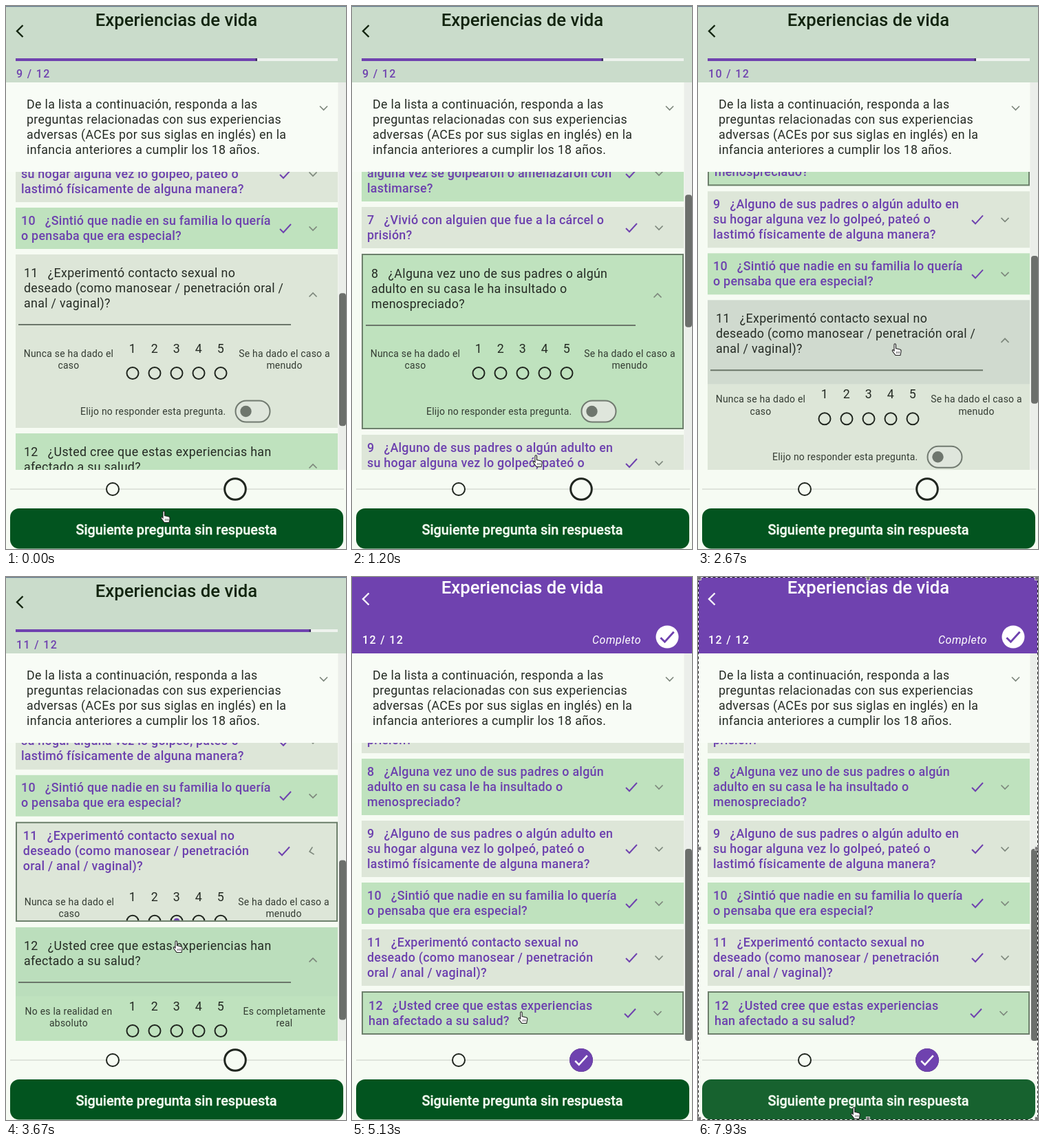
Write an HTML page that moves like this. It is 494 px wide and 789 px high and loops after 8 s.

```html
<!DOCTYPE html>
<html lang="es">
<head>
<meta charset="utf-8">
<title>Experiencias de vida</title>
<style>
  html, body { margin: 0; width: 100%; height: 100%; overflow: hidden; background: #f6fbf3; }
  svg { display: block; width: 100vw; height: 100vh; font-family: Roboto, sans-serif; }
  text { white-space: pre; }
  .body { font-size: 17.8px; letter-spacing: .33px; fill: #252b24; }
  .done { font-size: 17.85px; font-weight: 500; letter-spacing: .25px; fill: #6c40ae; }
  .label { font-size: 13.9px; letter-spacing: .26px; fill: #333b32; }
  .head { font-size: 25.7px; font-weight: 500; }
  .count { font-size: 16px; font-weight: 500; letter-spacing: 1.35px; }
  .state { font-size: 16px; font-style: italic; letter-spacing: .5px; fill: #fff; }
  .button { font-size: 19.85px; font-weight: 500; fill: #f3faf0; stroke: #f3faf0; stroke-width: .35px; }
  .mid { text-anchor: middle; }
</style>
</head>
<body>
<svg id="stage" viewBox="0 0 494 789" preserveAspectRatio="none"></svg>
<script>
const LOOP = 8000, PURPLE = '#6f42af', INK = '#20261f', PAPER = '#f6fbf3';
const VIEW = { top: 111, bottom: 674, list: 241, height: 563 };
const FIRST_TOP = 726, GAP = 8;
const stage = document.getElementById('stage');

const often = [['Nunca se ha dado el', 'caso'], ['Se ha dado el caso a', 'menudo']];
const real = [['No es la realidad en', 'absoluto'], ['Es completamente', 'real']];
const items = [
  { n: 6, short: ['6   ¿Sus padres o adultos en su hogar', 'alguna vez se golpearon o amenazaron con', 'lastimarse?'] },
  { n: 7, short: ['7   ¿Vivió con alguien que fue a la cárcel o', 'prisión?'] },
  { n: 8, short: ['8   ¿Alguna vez uno de sus padres o algún', 'adulto en su casa le ha insultado o', 'menospreciado?'],
    scale: often, answered: 1950 },
  { n: 9, short: ['9   ¿Alguno de sus padres o algún adulto en', 'su hogar alguna vez lo golpeó, pateó o', 'lastimó físicamente de alguna manera?'] },
  { n: 10, short: ['10   ¿Sintió que nadie en su familia lo quería', 'o pensaba que era especial?'] },
  { n: 11, short: ['11   ¿Experimentó contacto sexual no', 'deseado (como manosear / penetración', 'oral / anal / vaginal)?'],
    long: ['11   ¿Experimentó contacto sexual no', 'deseado (como manosear / penetración oral /', 'anal / vaginal)?'],
    scale: often, answered: 3562 },
  { n: 12, short: ['12   ¿Usted cree que estas experiencias', 'han afectado a su salud?'],
    long: ['12   ¿Usted cree que estas experiencias han', 'afectado a su salud?'],
    scale: real, answered: 4600 }
];
const intro = ['De la lista a continuación, responda a las', 'preguntas relacionadas con sus experiencias',
  'adversas (ACEs por sus siglas en inglés) en la', 'infancia anteriores a cumplir los 18 años.'];

// time, x, y of the pointer
const pointerPath = [[0, 232, 742], [250, 232, 744], [700, 245, 730], [1200, 270, 661], [1750, 248, 536], [2050, 250, 537],
  [2670, 289, 499], [3200, 250, 535], [3670, 250, 537], [4150, 247, 586], [4750, 248, 588], [5700, 250, 735],
  [6400, 248, 751], [7000, 246, 753], [7700, 231, 777], [8000, 229, 779]];

const clamp = v => Math.max(0, Math.min(1, v));
const smooth = p => p * p * (3 - 2 * p);
const ramp = (t, start, length) => smooth(clamp((t - start) / length));
const mix = (a, b, p) => a + (b - a) * p;

const text = (x, y, s, cls, extra = '') => `<text x="${x}" y="${y}" class="${cls}" ${extra}>${s}</text>`;
const rect = (x, y, w, h, fill, extra = '') => `<rect x="${x}" y="${y}" width="${w}" height="${h}" fill="${fill}" ${extra}/>`;
const ring = (x, y, r, w, fill = 'none') => `<circle cx="${x}" cy="${y}" r="${r}" fill="${fill}" stroke="${INK}" stroke-width="${w}"/>`;
const stroke = (d, color, w, move = '') => `<path d="${d}" fill="none" stroke="${color}" stroke-width="${w}" transform="${move}"/>`;
const tick = (x, y, color, w = 2, k = 1) => stroke('M-8 1L-3 6L8-6', color, w, `translate(${x} ${y}) scale(${k})`);
const chevron = (x, y, angle) => stroke('M-5.5-2.5L0 3L5.5-2.5', '#7d877c', 1.7, `translate(${x} ${y}) rotate(${angle})`);

function pointerAt(t) {
  const i = Math.max(1, pointerPath.findIndex(k => k[0] > t));
  const a = pointerPath[i - 1], b = pointerPath[i];
  const p = ramp(t, a[0], b[0] - a[0]);
  return { x: mix(a[1], b[1], p), y: mix(a[2], b[2], p) };
}

const focusAt = t => t < 300 ? 0 : t < 3250 ? 8 : t < 3900 ? 11 : 12;

function layout(t) {
  const focus = focusAt(t);
  const boxes = items.map(item => {
    const lines = item.short.length;
    const focused = item.n === focus;
    const open = item.scale && t < item.answered;
    const shut = item.scale ? ramp(t, item.answered, 200) : 1;
    const title = 16 + 22 * lines + (focused ? 3 : 0);
    const h = title + (open ? 170 : 139 * (1 - shut));
    return { item, lines, focused, open, shut, title, h };
  });
  let y = FIRST_TOP - boxes[0].h - boxes[1].h - 2 * GAP;
  for (const box of boxes) {
    box.y = y;
    y += box.h + GAP;
  }
  const total = y + 1;
  let scroll = mix(894, 477, ramp(t, 300, 600));
  scroll = mix(scroll, 728, ramp(t, 2275, 600));
  scroll = mix(scroll, 743, ramp(t, 3610, 350));
  scroll = Math.min(scroll, total - VIEW.height);
  for (const box of boxes) box.y += VIEW.top - scroll;
  return { boxes, total, scroll };
}

function answerBody(box, y, t) {
  const { item, focused } = box;
  let out = '';
  for (let i = 0; i < 5; i++) {
    const x = 184 + 32 * i;
    out += text(x, y + 6, i + 1, 'body mid') + ring(x, y + 35.5, 8.5, 2);
  }
  if (t > item.answered - 120) out += `<circle cx="248" cy="${y + 35.5}" r="4.5" fill="${PURPLE}"/>`;
  item.scale.forEach((pair, side) => pair.forEach((s, i) =>
    out += text(side ? 404.5 - focused : 91 + focused, y + 12 + 17.3 * i, s, 'label mid')));
  return out + text(108, y + 96, 'Elijo no responder esta pregunta.', 'label')
    + rect(333.5, y + 75.5, 50, 31, '#dfe6dc', 'rx="15.5" stroke="#717a70" stroke-width="2"')
    + `<circle cx="348.5" cy="${y + 91}" r="8.2" fill="#6e766d"/>`;
}

function question(box, t, pointer) {
  const { item, y, h, lines, focused, open, shut, title } = box;
  if (y > VIEW.bottom || y + h < VIEW.list) return '';
  const inset = focused ? 2 : 0;
  const even = item.n % 2 === 0;
  let out = rect(14, y, 468, h, even ? '#bfe2be' : '#dde6d8');
  if (open) {
    const inside = pointer.y - y;
    if (inside > 0 && inside < title + 40)
      out += rect(14, y, 468, title + 40, '#35506a', `opacity="${.08 * smooth(clamp(inside / 70))}"`);
    (item.long || item.short).forEach((s, i) => out += text(26 + inset, y + 33 + inset + 22 * i, s, 'body'));
    const rule = y + 36 + 22 * lines + inset;
    out += stroke(`M${18 + inset} ${rule}H${414 - inset}`, '#6b766a', 2);
    out += chevron(446 - inset, y + 26 + 11 * lines + inset, 180);
  } else {
    item.short.forEach((s, i) => out += text(22 + inset + 2 * (1 - shut), y + 24.5 + inset + 22 * i, s, 'done'));
    out += tick(406 - inset, y + title / 2, PURPLE) + chevron(446 - inset, y + title / 2, 180 * (1 - shut));
  }
  if (item.scale && shut < 1) {
    const clip = 'body' + item.n;
    const numbers = open ? y + 71 + 22 * lines + inset / 2 : y + title + 24;
    out += `<clipPath id="${clip}">${rect(14, y, 468, h, '#000')}</clipPath>`
      + `<g clip-path="url(#${clip})">${answerBody(box, numbers, t)}</g>`;
  }
  if (focused) out += rect(15, y + 1, 466, h - 2, 'none', 'stroke="#6d806c" stroke-width="2"');
  return out;
}

function header(t, full) {
  const count = 9 + items.filter(q => t >= q.answered).length;
  const ink = full > .5 ? '#fff' : '#12240f';
  const fade = `opacity="${full}"`;
  const filled = 468 * Math.min(count, 12) / 12;
  return rect(0, 0, 494, 111, '#cadccb') + rect(0, 0, 494, 1.2, '#61758a')
    + rect(14, 76, 468, 4, '#eef2ee') + rect(14, 76, filled, 4, PURPLE) + rect(11.5 + filled, 76, 2.5, 4, '#3f3063')
    + rect(0, 0, 494, 111, PURPLE, fade)
    + text(247.5, mix(28.5, 23.5, full), 'Experiencias de vida', 'head mid', `fill="${ink}"`)
    + stroke('M4.5-8.5L-4 0L4.5 8.5', ink, 2.4, `translate(20 ${mix(36.5, 32, full)})`)
    + text(15, mix(103.5, 96.5, full), count + ' / 12', 'count', `fill="${full > .5 ? '#fff' : PURPLE}"`)
    + `<g ${fade}>` + text(349, 96.5, 'Completo', 'state')
    + `<circle cx="458" cy="87" r="16.5" fill="#fff"/>` + tick(458, 87, PURPLE, 2.4, 1.2) + '</g>';
}

function footer(t, full, pointer) {
  const hover = t > 1000 && pointer.y > 732;
  return rect(0, 674, 494, 115, PAPER) + stroke('M6 702H491', '#d7dcd5', 1.3)
    + ring(155, 702, 9, 2, PAPER) + ring(333, 702, 15.3, 3, PAPER)
    + `<g opacity="${full}"><circle cx="333" cy="702" r="17" fill="${PURPLE}"/>` + tick(333, 702, '#fff', 2.4, 1.1) + '</g>'
    + rect(6, 730, 484, 58.5, hover ? '#17622f' : '#02541f', 'rx="13"')
    + text(247.5, 767.5, 'Siguiente pregunta sin respuesta', 'button mid');
}

function cursor(t, p) {
  const arrow = t > 4050 && t < 4700;
  const shape = arrow
    ? '<path d="M-4-8V6L-1 3L2 9L4.5 8L2 2H6Z" fill="#111" stroke="#fff" stroke-width=".8"/>'
    : '<path d="M-3.5-8Q-1.5-8.5-1.5-6.5V-1.5L4.5 0Q6.5.5 6 3L5 8.5H-2L-6.5 2.5Q-7 .5-5.5.5L-4 2V-6.5Q-4-8-3.5-8Z" fill="#fff" stroke="#222" stroke-width="1.1"/>'
      + stroke('M-.5 3V6M1.5 3V6M3.5 3V6', '#444', .8);
  return `<g transform="translate(${p.x} ${p.y})">${shape}</g>`;
}

function selection() {
  let out = rect(.5, .5, 493, 788, 'none', 'stroke="#fff"')
    + rect(.5, .5, 493, 788, 'none', 'stroke="#222" stroke-dasharray="4 3"');
  for (const x of [2, 247, 492]) for (const y of [2, 394.5, 787])
    if (x !== 247 || y !== 394.5) out += rect(x - 2.5, y - 2.5, 5, 5, '#777', 'stroke="#ddd" stroke-width=".8"');
  return out;
}

function draw(t) {
  const { boxes, total, scroll } = layout(t);
  const pointer = pointerAt(t);
  const full = ramp(t, 4650, 250);
  const thumb = VIEW.height * VIEW.height / total;
  const thumbTop = VIEW.top + scroll / total * VIEW.height;
  stage.innerHTML = rect(0, 0, 494, 789, PAPER)
    + `<clipPath id="list">${rect(0, VIEW.list, 483, VIEW.bottom - VIEW.list, '#000')}</clipPath>`
    + `<g clip-path="url(#list)">${boxes.map(b => question(b, t, pointer)).join('')}</g>`
    + rect(0, 111, 482, 130, '#f8fcf6')
    + intro.map((s, i) => text(30, 149 + 22 * i, s, 'body')).join('') + chevron(461.5, 148, 0)
    + rect(482.5, 111, 11.5, 563, '#ebeeea') + rect(484, thumbTop, 10, thumb, '#6c6f6c', 'rx="4"')
    + header(t, full) + footer(t, full, pointer)
    + (t >= 7700 ? selection() : '') + cursor(t, pointer);
}

const began = performance.now();
function tickFrame() {
  draw((performance.now() - began) % LOOP);
  requestAnimationFrame(tickFrame);
}
tickFrame();
</script>
</body>
</html>
```
